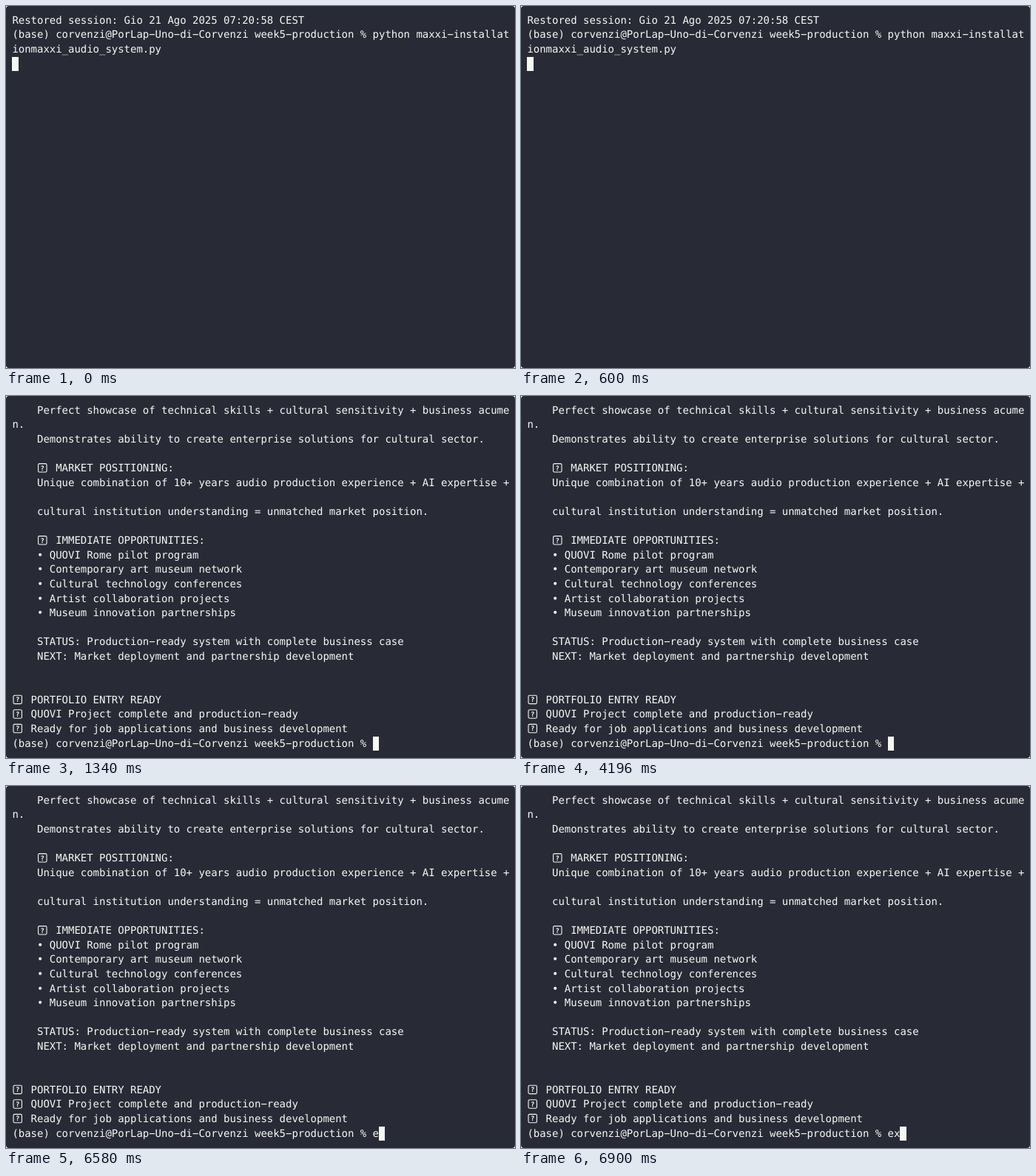
Recreate the animation shown at these times as an HTML page. Size 688 by 490 pixels, loop 7380 ms.

```html
<!DOCTYPE html>
<html lang="en">
<head>
<meta charset="utf-8">
<title>Terminal session</title>
<style>
  html, body { margin: 0; width: 100%; height: 100%; overflow: hidden; background: #fff; }
  svg { display: block; }
  text {
    font: 14px "DejaVu Sans Mono", monospace;
    fill: #f8f8f2;
    white-space: pre;
    text-rendering: geometricPrecision;
  }
  text.mark { font-size: 9px; font-weight: bold; text-anchor: middle; }
  .box { fill: none; stroke: #f8f8f2; stroke-width: 1.1; }
  .cursor { fill: #f8f8f2; }
</style>
</head>
<body>
<svg width="688" height="490" viewBox="0 0 688 490">
  <rect width="688" height="490" rx="4" fill="#282a36"/>
  <g id="screen"></g>
</svg>
<script>
const NS = "http://www.w3.org/2000/svg";
const SIZE = 14, COL = 8.4, ROW = 19.6, LOOP = 7380;
const screen = document.getElementById("screen");

const prompt = "(base) corvenzi@PorLap-Uno-di-Corvenzi week5-production % ";

const launch = [
  "Restored session: Gio 21 Ago 2025 07:20:58 CEST",
  prompt + "python maxxi-installat",
  "ionmaxxi_audio_system.py",
  ""
];

// □ stands for a missing glyph, two cells wide
const report = [
  "    Perfect showcase of technical skills + cultural sensitivity + business acume",
  "n.",
  "    Demonstrates ability to create enterprise solutions for cultural sector.",
  "",
  "    □  MARKET POSITIONING:",
  "    Unique combination of 10+ years audio production experience + AI expertise +",
  "",
  "    cultural institution understanding = unmatched market position.",
  "",
  "    □  IMMEDIATE OPPORTUNITIES:",
  "    • QUOVI Rome pilot program",
  "    • Contemporary art museum network",
  "    • Cultural technology conferences",
  "    • Artist collaboration projects",
  "    • Museum innovation partnerships",
  "",
  "    STATUS: Production-ready system with complete business case",
  "    NEXT: Market deployment and partnership development",
  "",
  "",
  "□  PORTFOLIO ENTRY READY",
  "□  QUOVI Project complete and production-ready",
  "□  Ready for job applications and business development"
];

const steps = [
  { at: 0, lines: launch },
  { at: 1000, lines: [...report, ""] },
  { at: 1340, lines: [...report, prompt] },
  { at: 6100, lines: [...report, prompt + "e"] },
  { at: 6900, lines: [...report, prompt + "ex"] }
];

const colX = c => COL * (c + 1);
const rowY = r => ROW * (r + 0.5);

function add(tag, attrs, content = "") {
  const el = document.createElementNS(NS, tag);
  for (const key in attrs) el.setAttribute(key, attrs[key]);
  el.textContent = content;
  screen.append(el);
}

function drawMissing(col, base) {
  const x = colX(col) + 1.6, y = base - 10.6;
  add("rect", { class: "box", x, y, width: 11.4, height: 11.4, rx: 1.6 });
  add("text", { class: "mark", x: x + 5.7, y: y + 9 }, "?");
}

function drawLine(line, row) {
  const base = rowY(row) + SIZE;
  const chars = [...line];
  chars.forEach((ch, c) => ch === "□" && drawMissing(c, base));
  // the terminal face has a wide hyphen
  const shown = line.replace(/□/g, " ").replace(/-/g, "\u2212");
  const xs = chars.map((_, c) => colX(c).toFixed(1)).join(" ");
  if (line) add("text", { x: xs, y: base.toFixed(1) }, shown);
}

function drawCursor(col, row) {
  const x = Math.round(colX(col)), y = Math.round(rowY(row));
  add("rect", {
    class: "cursor", x, y,
    width: Math.round(colX(col + 1)) - x,
    height: Math.round(rowY(row + 1)) - y
  });
}

let current = null;

function render(time) {
  const step = steps.findLast(s => s.at <= time);
  if (step === current) return;
  current = step;
  screen.replaceChildren();
  step.lines.forEach(drawLine);
  const last = step.lines.length - 1;
  drawCursor(step.lines[last].length, last);
}

const start = performance.now();
function tick() {
  render((performance.now() - start) % LOOP);
  requestAnimationFrame(tick);
}
tick();
</script>
</body>
</html>
```
